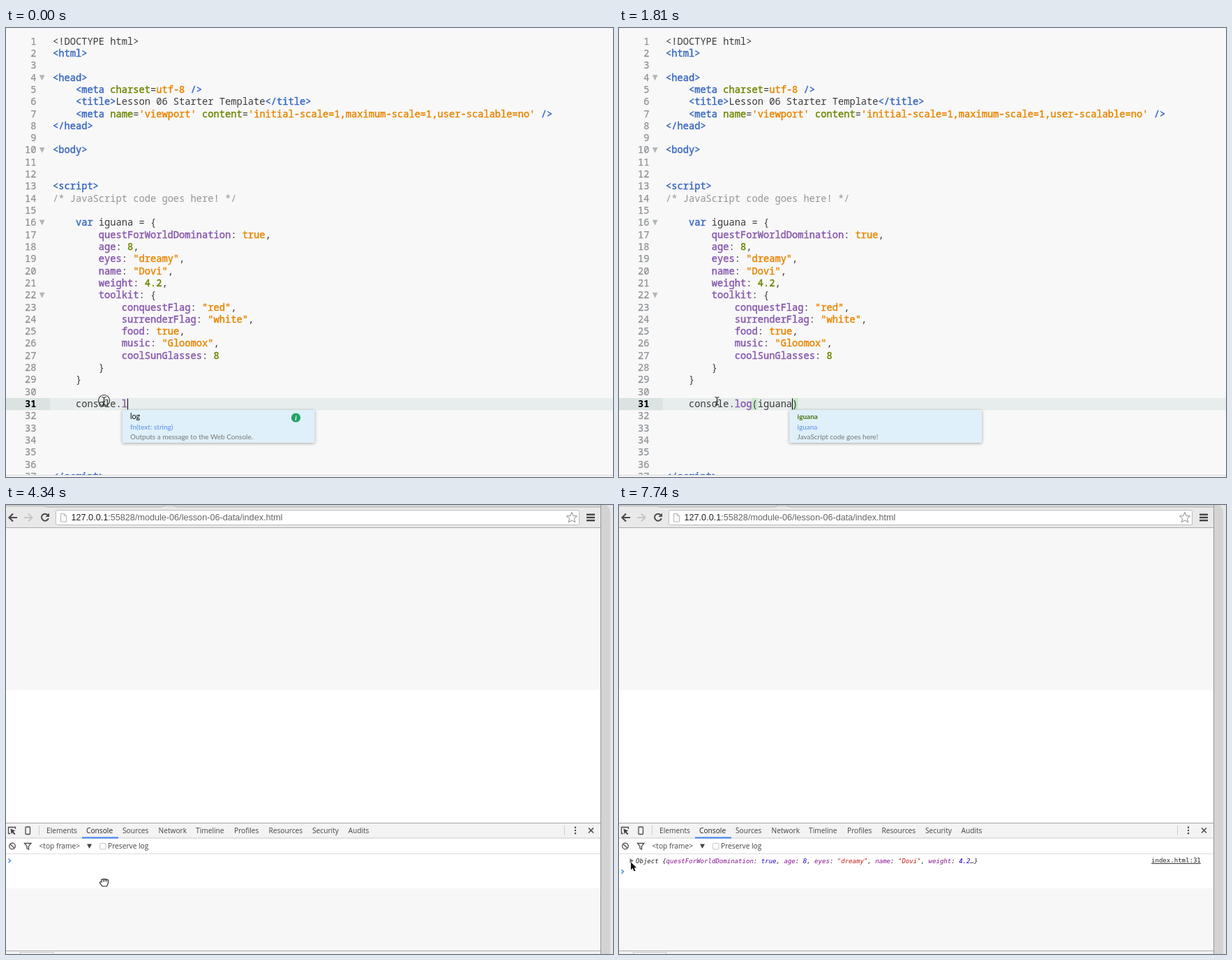
An HTML page for the animation above (8000 ms loop, 870 by 643 pixels).

```html
<!DOCTYPE html>
<html lang="en">
<head>
<meta charset="utf-8">
<title>Logging an object</title>
<style>
  html, body { margin: 0; width: 100%; height: 100%; overflow: hidden; background: #f8f8f8; }
  svg { display: block; width: 870px; height: 643px; }
  text { white-space: pre; }
  .code { font: 13.72px "Noto Sans Mono", monospace; fill: #3a3a3a; }
  /* A hairline outline gives the medium weight the font lacks */
  .tag, .attr, .str, .prop, .num { fill: var(--ink); stroke: var(--ink); stroke-width: .45; }
  .num { --ink: #8b9095; text-anchor: end; stroke-width: .25; }
  .now { --ink: #000; font-weight: 700; stroke-width: 0; }
  .tag { --ink: #3868c0; }
  .attr { --ink: #6d8600; }
  .str { --ink: #e88501; }
  .prop { --ink: #8757ad; }
  .note { fill: #949494; }
  .tip { font: 10px Lato, sans-serif; }
  .shade { filter: drop-shadow(0 1px 2px #0005); }
  .ui { font: 10.2px "Open Sans", sans-serif; fill: #444; }
  .url { font: 12.65px "Liberation Sans", Arial, sans-serif; fill: #666; }
  .log { font: 9.06px "DejaVu Sans Mono", monospace; fill: #222; }
  .badge { font: 14px "Liberation Sans", Arial, sans-serif; fill: #fff; text-anchor: middle; }
  .icon { fill: none; stroke: #4a4a4a; stroke-width: 1.3; }
</style>
</head>
<body>
<svg id="stage" viewBox="0 0 870 643"></svg>
<script>
const LOOP = 8000, CHAR = 8.232, LEFT = 67, LINE = 17.31;
const stage = document.getElementById('stage');

const esc = s => s.replace(/&/g, '&amp;').replace(/</g, '&lt;');
const rect = (x, y, w, h, fill, more = '') =>
  `<rect x="${x}" y="${y}" width="${w}" height="${h}" fill="${fill}" ${more}/>`;
const circle = (x, y, r, fill, more = '') =>
  `<circle cx="${x}" cy="${y}" r="${r}" fill="${fill}" ${more}/>`;
const path = (d, more = 'class="icon"') => `<path d="${d}" ${more}/>`;
const label = (x, y, cls, s, more = '') => `<text x="${x}" y="${y}" class="${cls}" ${more}>${esc(s)}</text>`;
const group = (x, y, body) => `<g transform="translate(${x} ${y})">${body}</g>`;
// Last entry whose start time has been reached
const at = (list, t) => list.filter(e => e[0] <= t).pop();

// ---- Code editor ----

const SOURCE = `<!DOCTYPE html>
<html>

<head>
    <meta charset=utf-8 />
    <title>Lesson 06 Starter Template</title>
    <meta name='viewport' content='initial-scale=1,maximum-scale=1,user-scalable=no' />
</head>

<body>


<script>
/* JavaScript code goes here! */

    var iguana = {
        questForWorldDomination: true,
        age: 8,
        eyes: "dreamy",
        name: "Dovi",
        weight: 4.2,
        toolkit: {
            conquestFlag: "red",
            surrenderFlag: "white",
            food: true,
            music: "Gloomox",
            coolSunGlasses: 8
        }
    }







<\/script>`.split('\n');

const TOKENS = new RegExp([
  '(?<plain><!.*>)',
  '(?<note>/\\*.*\\*/)',
  '(?<str>"[^"]*"|\'[^\']*\'|utf-8|\\btrue\\b)',
  '(?<tag></?\\w+>?|/?>|\\bvar\\b)',
  '(?<attr>\\w+(?==)|(?<=: )[\\d.]+)',
  '(?<prop>\\w+(?=:)|(?<=\\.)l\\w*)'
].join('|'), 'g');

function highlight(s) {
  let out = '', end = 0;
  for (const m of s.matchAll(TOKENS)) {
    const cls = Object.keys(m.groups).find(k => m.groups[k]);
    out += esc(s.slice(end, m.index)) + `<tspan class="${cls}">${esc(m[0])}</tspan>`;
    end = m.index + m[0].length;
  }
  return out + esc(s.slice(end));
}

const baseline = n => 23.7 + (n - 1) * LINE;

function codeLine(s, n) {
  const indent = s.length - s.trimStart().length;
  return `<text x="${LEFT + indent * CHAR}" y="${baseline(n)}" class="code">${highlight(s.trim())}</text>`;
}

const editor = rect(0, 0, 870, 643, '#f8f8f8') +
  rect(0, 530, 63, 17.3, '#dae2e2') + rect(63, 530, 807, 17.3, '#e7edec') +
  SOURCE.map((s, i) => codeLine(s, i + 1) +
    label(43.5, baseline(i + 1), 'code num' + (i == 30 ? ' now' : ''), String(i + 1))).join('') +
  [4, 10, 16, 22].map(n =>
    path(`M47.8 ${baseline(n) - 8.5}h7.8l-3.9 8z`, 'fill="#b4b6b6"')).join('') +
  rect(0, 640, 870, 3, '#f6f6f6') + rect(0, 640, 870, 1, '#d9d9d9');

// Start time, text after "console.", characters right of the caret
const TYPING = [
  [0, 'l', 0], [150, 'lo', 0], [330, 'log', 0], [770, 'log()', 1],
  ...[1070, 1210, 1360, 1510, 1660, 1810].map((time, i) => [time, `log(${'iguana'.slice(0, i + 1)})`, 1]),
  [2400, 'log(iguana)', 0], [2700, 'log(iguana);', 0]
];

const hint = (x, title, titleStyle, type, doc, extra = '') => group(x, 547,
  rect(0, 0, 276, 47, '#dff0fa', 'class="shade" rx="1"') +
  label(11.5, 12.8, 'tip', title, titleStyle) +
  label(11.5, 27.6, 'tip', type, 'fill="#5a8df0"') +
  label(11.5, 42.4, 'tip', doc, 'fill="#777"') + extra);

const infoIcon = circle(249, 11, 6.6, '#21a366') +
  label(249, 14.5, 'tip', 'i', 'fill="#fff" text-anchor="middle" style="font-style:italic;font-weight:700"');

const SUGGESTIONS = [['innerHeight', 'number'], ['navigator', 'navigator'],
  ['outerHeight', 'number'], ['String', 'fn(value: ?) : string'], ['toString', 'fn() : string']];

const suggestions = x => group(x, 397,
  rect(0, 0, 276, 132, '#f8f8f8', 'class="shade" opacity=".9"') +
  rect(0, 0, 276, 45.5, '#dcebf5', 'opacity=".82"') +
  label(12, 12, 'tip', 'iguana', 'fill="#567a1b"') +
  label(12, 27, 'tip', 'iguana', 'fill="#5a8df0"') +
  label(12, 41.5, 'tip', 'JavaScript code goes here!', 'fill="#777"') +
  SUGGESTIONS.map(([name, type], i) => {
    const y = 58.3 + i * 16.45;
    return label(12, y, 'tip', name) +
      label(255, y, 'tip', type, 'fill="#aaa" text-anchor="end" style="font-style:italic"');
  }).join(''));

function popup(t, caret) {
  if (t < 770) return hint(t < 150 ? 166.5 : caret - 4, 'log', 'style="font-size:10.7px"',
    'fn(text: string)', 'Outputs a message to the Web Console.', infoIcon);
  if (t >= 1070 && t < 1360) return suggestions(caret - 4.5);
  if (t >= 1360 && t < 2260) return hint(caret - 4, 'iguana', 'fill="#47720f" style="font-weight:700"',
    'iguana', 'JavaScript code goes here!');
  return '';
}

const beam = path('M137.5 528.5q3 0 3 2q0-2 3-2M140.5 530V538.5M137.5 540q3 0 3-2q0 2 3 2M138.5 535h4',
  'fill="none" stroke="#222" stroke-width="1.1"');
const clickRing = circle(140.5, 533.5, 8, 'none', 'stroke="#333" stroke-width="1.2"');
const hand = path('M138 546l-3.5-5q0-2 2.5-1l-.5-3q1-2 2.5-.3q1-2.2 2.5-.4q1.5-1.5 2.6.4q2-1 2.6 1.3l-.6 4.5-1.6 3.5z' +
  'M139.3 537l.6 2.5M141.8 536.5l.2 2.7M144.3 537.3l-.1 2.2', 'fill="#fff" stroke="#222" stroke-width="1.1"');

// ---- Application switcher ----

const APPS = [['o', '#fbc02d'], ['o', '#dd4b3e'], ['s', '#42c9bd'], ['s', '#3c9df0'], ['s', '#44304c', '•'],
  ['o', '#36a9f3', '1'], ['s', '#252627'], ['o', '#f2c02e', '303'], ['s', '#4a8529', '1'],
  ['o', '#1673c3'], ['o', '#6d3f91'], ['s', '#338c3d'], ['s', '#2573c9']];

const switcher = rect(0, 265.5, 870, 114.5, '#ededed') +
  rect(0, 265.5, 20, 114.5, '#dcdcdc') + rect(855, 265.5, 15, 114.5, '#d3d3d3') +
  rect(-30, 286, 58, 74, '#b0b0b0', 'rx="8"') +
  APPS.map(([shape, color, badge], i) => {
    const x = -9 + i * 70.9;
    const mark = shape == 'o' ? circle(x, 323, 29.5, color) : rect(x - 29, 294, 58, 58, color, 'rx="3"');
    if (!badge) return mark;
    const half = badge.length > 1 ? 15.5 : 12.5;
    return mark + rect(x + 20 - half, 290.5, half * 2, 25, '#f8463b', 'rx="12.5"') +
      label(x + 20, 308, 'badge', badge);
  }).join('') +
  label(35.5, 374.5, 'url', 'Zolume', 'text-anchor="end" style="font-size:12.3px"');

function editorView(t) {
  const [, typed, after] = at(TYPING, t);
  const line = '    console.' + typed;
  const column = n => LEFT + n * CHAR;
  const caret = column(line.length - after);
  const brace = n => rect(column(n) - .3, 530, 8.5, 17, '#c9e8cd');
  const caretOn = t < 3300 || t >= 3750;
  return editor +
    (t >= 770 && t < 2700 ? brace(15) + brace(line.indexOf(')')) : '') +
    codeLine(line, 31) +
    (caretOn ? rect(Math.round(caret), 530.5, 1, 16, '#000') : '') +
    popup(t, caret) +
    (t >= 3750 ? switcher + hand : beam) + (t < 150 ? clickRing : '');
}

// ---- Browser ----

const TABS = [[58, 'Elements'], [115, 'Console'], [167, 'Sources'], [218.5, 'Network'], [272, 'Timeline'],
  [327, 'Profiles'], [376.5, 'Resources'], [439, 'Security'], [490.5, 'Audits']];

const toolbar = rect(0, 0, 853, 33, '#e9e9e9') + rect(0, 0, 853, 3, '#d4d4d4') +
  path('M0 0H54q2 3 5 3H222q4 0 5-3M240 0q2 3 6 3H853', 'fill="none" stroke="#b3b3b3"') +
  rect(0, 32, 853, 1, '#aaa') +
  rect(71.5, 7.5, 750, 21, '#fff', 'stroke="#bdbdbd" rx="2"') +
  path('M16 18H5M10 12.5L4.5 18L10 23.5', 'fill="none" stroke="#4b4b4b" stroke-width="2.2"') +
  path('M26 18H37M32 12.5L37.5 18L32 23.5', 'fill="none" stroke="#c7c7c7" stroke-width="2.2"') +
  path('M59.6 14.2A5 5 0 1 0 60.8 19', 'fill="none" stroke="#4b4b4b" stroke-width="2"') +
  path('M62 11.5v5.5h-5.5z', 'fill="#4b4b4b"') +
  path('M78.5 12.5h5l3 3v8.5h-8zM83.5 12.5v3h3', 'fill="#fafafa" stroke="#b5b5b5"') +
  `<text x="93.5" y="22" class="url"><tspan fill="#222">127.0.0.1</tspan>:55828/module-06/lesson-06-data/index.html</text>` +
  path('M811 10.5l2.1 5 5.4.4-4.1 3.5 1.3 5.3-4.7-2.9-4.7 2.9 1.3-5.3-4.1-3.5 5.4-.4z',
    'fill="#fff" stroke="#888"') +
  [12.5, 16.7, 20.9].map(y => rect(832, y, 12, 2.4, '#444')).join('');

const devtools = rect(0, 455, 853, 22, '#f3f3f3') + rect(0, 455, 853, 1, '#a6a6a6') +
  rect(0, 476.5, 853, 1, '#ccc') + rect(0, 499, 853, 1, '#ddd') +
  rect(109, 475.5, 52, 2, '#3b80f0') +
  TABS.map(([x, s]) => label(x, 470, 'ui', s, s == 'Console' ? 'style="fill:#222"' : '')).join('') +
  rect(47, 459, 1, 14, '#ccc') + rect(800, 459, 1, 14, '#ccc') +
  path('M6 470.5H3.5V461.5H13.5V464') +
  path('M6.5 463.5l7 3-3 1.2 3 3.3-1.5 1.3-3-3.4-1.5 2.6z', 'fill="#444"') +
  rect(28, 461, 6.5, 10.5, 'none', 'class="icon" rx="1"') +
  [461.8, 466, 470.2].map(y => circle(816, y, 1.2, '#444')).join('') +
  path('M835 462.5l7 7M842 462.5l-7 7', 'class="icon" style="stroke-width:1.6"') +
  circle(9, 488.5, 4.3, 'none', 'class="icon"') + path('M6 485.5l6 6') +
  path('M26.5 484.5h9.5l-3.5 4.2v4.5l-2.5-1.5v-3z') +
  label(47.5, 492.3, 'ui', '<top frame>') + path('M116 485.5h7l-3.5 6.5z', 'fill="#444"') +
  rect(134.5, 484.5, 8.5, 8.5, '#fff', 'stroke="#c5c5c5" rx="1"') +
  label(146, 492.3, 'ui', 'Preserve log');

const browser = rect(0, 0, 870, 643, '#f7f7f7') + rect(0, 265, 853, 284, '#fff') +
  toolbar + devtools +
  rect(0, 638, 853, 1, '#aaa') + rect(0, 639, 853, 4, '#f1f1f1') +
  rect(20.5, 641, 47, 6, '#fff', 'stroke="#bbb"') +
  rect(852, 0, 18, 643, '#d3d3d3') + rect(852, 0, 1, 643, '#979797') +
  path('M861 0q4 3 5 10V643H870V0z', 'fill="#e6e6e6"');

const FIELDS = [['questForWorldDomination', 'true'], ['age', '8'], ['eyes', '"dreamy"'],
  ['name', '"Dovi"'], ['weight', '4.2']];

const logged = path('M15.5 506v7l5.5-3.5z', 'fill="#777"') +
  `<text x="24" y="512.8" class="log" style="font-style:italic">Object {` +
  FIELDS.map(([key, value]) => `<tspan fill="#881391">${key}</tspan>: ` +
    `<tspan fill="${value[0] == '"' ? '#c41a16' : '#1c00cf'}">${value}</tspan>`).join(', ') + '…}</text>' +
  label(763, 512, 'log', 'index.html:31', 'style="text-decoration:underline"');

const prompt = y => path(`M3.5 ${y - 2.8}l3 2.8-3 2.8`, 'fill="none" stroke="#3a86f0" stroke-width="1.4"');

const arrow = (x, y) => group(x, y,
  path('M0 0V11L2.6 8.6L4.5 13L6.5 12.2L4.7 8H8.2Z', 'fill="#111" stroke="#fff" stroke-width=".8" paint-order="stroke"'));

const POINTER = [[4490, 140, 533], [5230, 161, 521], [5380, 222, 445], [5520, 255, 391]];
const BLINK = [[0, 0], [4780, 1], [5230, 0], [5520, 1], [5820, 0], [6270, 1], [6717, 0], [7158, 1], [7740, 0]];

function pointer(t) {
  if (t < 6570) return at(POINTER, t).slice(1);
  if (t >= 7740) return [17, 511.5];
  const p = Math.min(7, Math.floor((t - 6570) / 147)) / 7;
  const eased = p * p * (3 - 2 * p);
  return [254 - 238 * eased, 383 + 133 * eased];
}

function browserView(t) {
  const done = t >= 5820, y = done ? 525 : 509.5;
  return browser + (done ? logged : '') + prompt(y) +
    (at(BLINK, t)[1] ? rect(15, y - 5.5, 1, 11, '#222') : '') +
    (t < 4490 ? hand : arrow(...pointer(t)));
}

let shown = '';
function draw(now) {
  const t = now % LOOP;
  const view = t < 4340 ? editorView(t) : browserView(t);
  if (view !== shown) stage.innerHTML = shown = view;
  requestAnimationFrame(draw);
}
draw(0);
</script>
</body>
</html>
```
